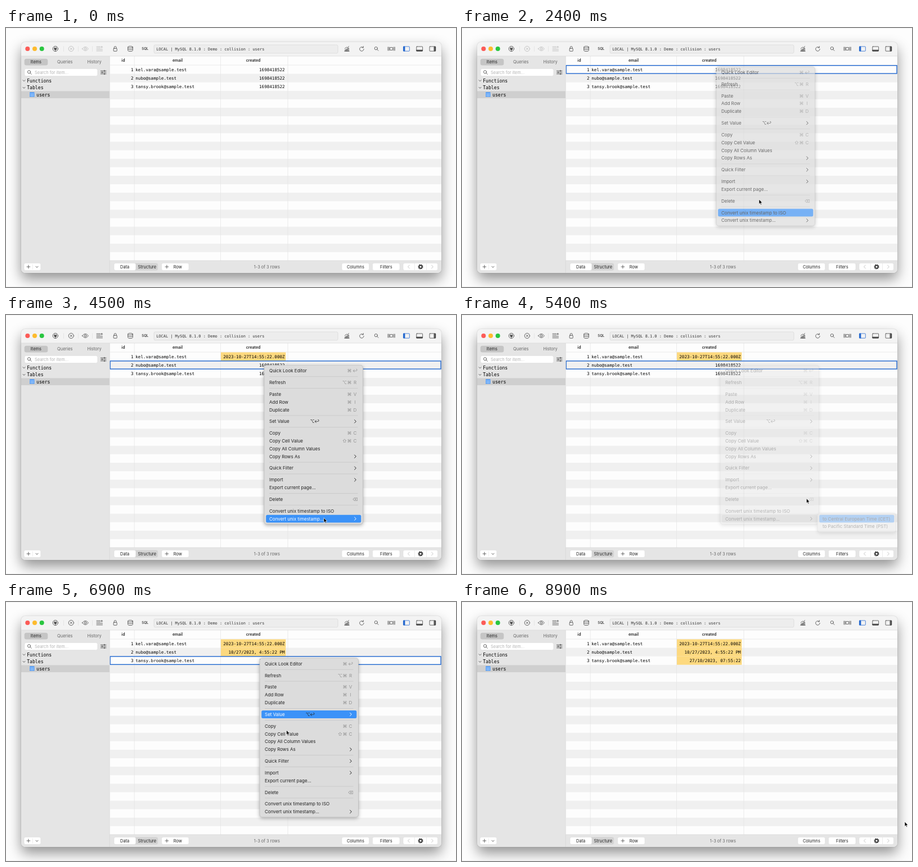
These frames come from a looping animation (800 px wide and 461 px high, 9000 ms). An HTML page:

```html
<!DOCTYPE html>
<html lang="en">
<head>
<meta charset="utf-8">
<title>Timestamp conversion</title>
<style>
html, body { margin: 0; width: 100%; height: 100%; overflow: hidden; background: #fdfdfd; }
svg { position: absolute; left: 0; top: 0; display: block; }
text { font: 7.45px Inter, "DejaVu Sans", sans-serif; fill: #222; white-space: pre; }
.window { position: absolute; left: 27px; top: 25px; width: 747px; height: 411px; border-radius: 7px;
  box-shadow: 0 0 1px rgba(0,0,0,.5), 0 11px 23px rgba(0,0,0,.42); }
.mono { font: 7.57px "DejaVu Sans Mono", monospace; fill: #000; }
.side { font-size: 8.13px; }
.title { font-size: 6.95px; fill: #333; }
.head { font-size: 6.95px; font-weight: 600; }
.sql { font-size: 6.1px; font-weight: 600; fill: #444; }
.dim { fill: #666; }
.hint { fill: #b4b4b4; }
.end { text-anchor: end; }
.mid { text-anchor: middle; }
.icon { fill: none; stroke: #454545; stroke-width: .8; stroke-linecap: round; stroke-linejoin: round; }
.off { stroke: #b9b9b9; }
.blue { stroke: #2468cf; }
.button { fill: #fff; stroke: #d9d9d9; stroke-width: .5; }
.menu text { font-size: 8.02px; }
.menu .key { text-anchor: middle; fill: #929292; }
.menu .dark { fill: #222; }
.panel { fill: #dcdcdc; stroke: #b5b5b5; stroke-width: .6; filter: drop-shadow(0 2px 3px rgba(0,0,0,.3)); }
.rule { stroke: #c3c3c3; stroke-width: .7; }
</style>
</head>
<body>
<div class="window"></div>
<svg id="stage" width="800" height="461" viewBox="0 0 800 461">
  <defs><clipPath id="frame"><rect x="27" y="25" width="747" height="411" rx="7"/></clipPath></defs>
  <path d="M0 .5H800M0 460.5H800" stroke="#f3f3f3"/>
  <g clip-path="url(#frame)">
    <rect x="27" y="25" width="747" height="411" fill="#e5e5e5"/>
    <rect x="27" y="25" width="747" height="25" fill="#f3f3f3"/>
    <rect x="184" y="50" width="590" height="364" fill="#fdfdfd"/>
    <g id="grid"></g>
    <path d="M27 50H774M184.3 50V436M184 414H774" stroke="#d6d6d6" stroke-width=".7"/>
  </g>

  <circle cx="38.3" cy="37" r="4" fill="#fc5b57"/>
  <circle cx="51" cy="37" r="4" fill="#fdbb2e"/>
  <circle cx="63.7" cy="37" r="4" fill="#29c640"/>
  <path d="M102.5 32.5V42M128.5 32.5V42M153.5 32.5V42" stroke="#dedede" stroke-width=".7"/>
  <g class="icon">
    <circle cx="87.8" cy="37" r="4.6"/>
    <path d="M86.3 34.2V36M89.3 34.2V36M87.8 39V41.4"/>
    <path d="M85.8 36H89.8V37.2Q89.8 39 87.8 39T85.8 37.2Z" fill="#454545"/>
  </g>
  <g class="icon edit">
    <circle cx="115.8" cy="37" r="4.6"/><path d="M114.1 35.3L117.5 38.7M117.5 35.3L114.1 38.7"/>
    <path d="M135.6 37Q141 29.8 146.4 37Q141 44.2 135.6 37Z"/><circle cx="141" cy="37" r="1.8"/>
    <path d="M161 33.3H168M161 35.8H168M161 38.3H171.5M161 40.8H171.5M170.3 36V32.7M169 34L170.3 32.7L171.6 34"/>
  </g>
  <g class="icon">
    <rect x="191.2" y="36.3" width="6" height="5" rx=".7"/><path d="M192.3 36.2V34.6Q192.3 32.7 194.2 32.7T196.1 34.6V36.2"/>
    <ellipse cx="221" cy="34" rx="4.3" ry="1.6"/>
    <path d="M216.7 34V40Q216.7 41.6 221 41.6T225.3 40V34M216.7 37Q216.7 38.6 221 38.6T225.3 37"/>
    <path d="M601.8 41.3H610.2M602.8 41V38.7H604.3V41M605.3 41V37.2H606.8V41M607.8 41V35.6H609.3V41M602.3 36.6L605.3 34.2L606.8 35L609.6 32.6"/>
    <path d="M634.9 34.7A3.7 3.7 0 1 0 636.1 37.4M633 34.9H635.3V32.6"/>
    <circle cx="657.8" cy="36.2" r="2.6"/><path d="M659.8 38.2L662 40.4"/>
    <rect x="682.8" y="34.7" width="4.6" height="4.6"/>
    <path d="M680.9 34V40M689.3 34V40M679 34V40M691.2 34V40"/>
    <rect x="729.8" y="33" width="10.8" height="8.2" rx=".8"/><path d="M730 39.2H740.4V41H730Z" fill="#454545"/>
    <rect x="753" y="33" width="10.8" height="8.2" rx=".8"/><path d="M761.3 33.2H763.5V41H761.3Z" fill="#454545"/>
    <g class="blue"><rect x="706.5" y="33" width="10.8" height="8.2" rx=".8"/><path d="M706.8 33.2H709V41H706.8Z" fill="#2468cf"/></g>
  </g>
  <text class="sql" x="241.2" y="39.3">SQL</text>
  <rect x="263" y="30" width="327" height="15" rx="2.5" fill="#ededed" stroke="#d4d4d4" stroke-width=".6"/>
  <text class="mono title" x="267.2" y="39.6">LOCAL | MySQL 8.1.0 : Demo : collision : users</text>

  <rect x="32.7" y="54.7" width="41.6" height="11.8" rx="3.5" fill="#c5c5c5"/>
  <text class="mid" x="53.3" y="63.2">Items</text>
  <text class="mid dim" x="104.8" y="63.2">Queries</text>
  <text class="mid dim" x="157" y="63.2">History</text>
  <rect class="button" x="33" y="72.4" width="129.8" height="13.2" rx="3"/>
  <g class="icon">
    <circle cx="41" cy="78.2" r="2.6"/><path d="M43 80.2L45.3 82.5"/>
    <path d="M168.3 76.3H178M168.3 79H178M168.3 81.7H178"/>
    <path d="M175 75.5V77.1M171 78.2V79.8M175 80.9V82.5" stroke-width="1.3"/>
    <path d="M30 92.7L32 94.8L34 92.7M30 105.3L32 107.4L34 105.3"/>
  </g>
  <text class="hint" x="51" y="81.7">Search for item...</text>
  <rect x="27" y="112.4" width="157" height="12.6" fill="#cfcfcf"/>
  <rect x="42" y="114.2" width="8.6" height="8.4" rx=".8" fill="#4c98f5"/>
  <path d="M42 116.8H50.6M42 119.6H50.6M44.9 116.8V122.6M47.8 116.8V122.6" stroke="#d6e7fb" stroke-width=".6"/>
  <text class="mono side" x="37.2" y="96.6">Functions</text>
  <text class="mono side" x="37.2" y="109.2">Tables</text>
  <text class="mono side" x="54" y="121.7">users</text>

  <g class="button">
    <rect x="32" y="418.5" width="29.8" height="13" rx="3"/>
    <rect x="192" y="418.5" width="78" height="13" rx="3" style="fill:#d3d3d3"/>
    <rect x="192" y="418.5" width="38.8" height="13" rx="3"/>
    <rect x="276.6" y="418.5" width="48.4" height="13" rx="3"/>
    <rect x="597" y="418.5" width="48.6" height="13" rx="3"/>
    <rect x="651.5" y="418.5" width="48.5" height="13" rx="3"/>
    <rect x="706" y="418.5" width="61.5" height="13" rx="3"/>
    <path d="M47.3 420.5V429.5M726.5 419V431M747.5 419V431"/>
  </g>
  <g class="icon">
    <path d="M37 425H42.8M39.9 422.1V427.9M52.9 424.2L55 426.4L57.1 424.2M283 425H288.8M285.9 422.1V427.9"/>
    <path class="off" d="M717.3 422L714.5 425L717.3 428M756.5 422L759.3 425L756.5 428"/>
    <circle cx="737" cy="425" r="2.6" style="stroke:#222;stroke-width:1.5"/>
    <circle cx="737" cy="425" r="3.9" style="stroke:#222;stroke-width:1.3;stroke-linecap:butt" stroke-dasharray="1.53 1.53"/>
  </g>
  <text class="mid" x="211.2" y="427.7">Data</text>
  <text class="mid" x="250.8" y="427.7">Structure</text>
  <text x="297.8" y="427.7">Row</text>
  <text class="mid dim" x="463.8" y="428.2">1-3 of 3 rows</text>
  <text class="mid" x="621.4" y="427.7">Columns</text>
  <text class="mid" x="675.8" y="427.7">Filters</text>

  <g id="menu" class="menu"></g>
  <path id="cursor" d="M0 0V8.4L1.9 6.7L3.2 9.7L4.6 9.1L3.3 6.2H5.9Z" stroke="#fff" stroke-width=".7"/>
</svg>
<script>
const LOOP = 9000, STEP = 100, LAG = 50, FADE = 300;
const ROW = 15.12, TOP = 66.4, PITCH = 13.85;
const $ = id => document.getElementById(id);
const text = (x, y, s, cls = "") => `<text x="${x}" y="${y}" class="${cls}">${s}</text>`;
const rect = (x, y, w, h, extra) => `<rect x="${x}" y="${y}" width="${w}" height="${h}" ${extra}/>`;

const rows = [
  { mail: "kel.vara@sample.test", date: "2023-10-27T14:55:22.000Z", done: 2600 },
  { mail: "nubo@sample.test", date: "10/27/2023, 4:55:22 PM", done: 5500 },
  { mail: "tansy.brook@sample.test", date: "27/10/2023, 07:55:22", done: 8500 },
];

const menus = [
  { x: 452, y: 69.1, open: 1100, pick: 2300, sub: Infinity },
  { x: 459, y: 89.3, open: 3600, pick: 5200, sub: 4700 },
  { x: 451, y: 99.9, open: 6500, pick: 8200, sub: 7300 },
];

// label, shortcut keys aligned right; "-" is a separator
const entries = [
  ["Quick Look Editor", "⌘↩"], "-", ["Refresh", "⌥⌘R"], "-",
  ["Paste", "⌘V"], ["Add Row", "⌘I"], ["Duplicate", "⌘D"], "-",
  ["Set Value", ">"], "-",
  ["Copy", "⌘C"], ["Copy Cell Value", "⇧⌘C"], ["Copy All Column Values", ""], ["Copy Rows As", ">"], "-",
  ["Quick Filter", ">"], "-", ["Import", ">"], ["Export current page...", ""], "-",
  ["Delete", "⌫"], "-", ["Convert unix timestamp to ISO", ""], ["Convert unix timestamp...", ">"],
];
const zones = ["to Central European Time (CET)", "to Pacific Standard Time (PST)"];

// time, x, y of the pointer tip
const path = [
  [200, 472, 266], [500, 462, 170], [900, 452, 72], [1300, 453, 74], [1600, 497, 208],
  [1900, 525, 300], [2100, 528, 328], [2300, 528, 328], [2400, 528, 305], [2800, 468, 122],
  [3200, 459, 91], [3800, 460, 94], [4150, 520, 270], [4400, 562, 360], [4500, 565, 361],
  [4700, 570, 362], [5000, 645, 362], [5300, 645, 362], [5900, 449, 149], [6300, 451, 102],
  [6700, 452, 106], [7100, 545, 350], [7250, 558, 373], [7400, 565, 373], [7800, 645, 374],
  [8000, 651, 385], [8100, 652.5, 385], [8300, 652.5, 385], [8900, 787, 391],
];

function pointer(t) {
  const i = path.findIndex(p => p[0] >= t);
  if (i <= 0) return (i ? path[path.length - 1] : path[0]).slice(1);
  const [a, b] = [path[i - 1], path[i]], k = (t - a[0]) / (b[0] - a[0]);
  return [a[1] + (b[1] - a[1]) * k, a[2] + (b[2] - a[2]) * k];
}

function drawGrid(t) {
  let s = "";
  for (let i = 1; i < 23; i += 2) s += rect(185, TOP + i * ROW, 589, ROW, 'fill="#f0f0f0"');
  s += '<path d="M185 66H774M228.2 50V414M381.5 50V414M501 50V414" stroke="#e2e2e2" stroke-width=".7"/>';
  s += text(208.4, 60, "id", "head mid") + text(305, 60, "email", "head mid") + text(439.6, 60, "created", "head mid");
  rows.forEach((r, i) => {
    const y = TOP + i * ROW, base = y + 10.3, done = t >= r.done;
    if (done) s += rect(382, y, 115.4, ROW, 'fill="#fdd97f"');
    s += text(226.6, base, i + 1, "mono end") + text(230.3, base, r.mail, "mono");
    s += text(495.6, base, done ? r.date : "1698418522", "mono end");
    if (t >= menus[i].open && !done) s += rect(185.2, y + .3, 587.8, ROW - .8, 'fill="none" stroke="#1f66cf" stroke-width="1.4"');
  });
  return s;
}

function menuRow(x, y, w, label, keys, fill, ink) {
  const color = ink ? ` style="fill:${ink}"` : "";
  let s = fill ? rect(x + 3.2, y - PITCH / 2, w - 6.4, PITCH, `rx="2.5" fill="${fill}"`) : "";
  s += `<g${color}>` + `<text x="${x + 9}" y="${y + 2.9}"${color}>${label}</text>`;
  if (keys === ">") {
    s += `<path d="M${x + 160.6} ${y - 2.7}l2.7 2.7l-2.7 2.7" class="icon" style="stroke:${ink || "#222"};stroke-width:1"/>`;
    if (label === "Set Value") s += text(x + 85.5, y + 2.9, "⌥", "key dark") + text(x + 93.5, y + 2.9, "↩", "key dark");
  } else {
    [...keys].reverse().forEach((k, i) => {
      s += `<text class="key" x="${x + 161.5 - [0, 10, 18.7][i]}" y="${y + 2.9}"${color}>${k}</text>`;
    });
  }
  return s + "</g>";
}

function drawMenu(m, t) {
  const [px, py] = pointer(Math.min(t, m.pick) - LAG);
  const nested = t >= m.sub, inSub = nested && px > m.x + 173;
  const ink = t > m.pick ? "" : "#fff";
  const over = y => Math.abs(py - y) < PITCH / 2;
  let s = rect(m.x, m.y, 175.5, 283, 'rx="4.5" class="panel"'), y = m.y + 10, last = y;
  for (const e of entries) {
    if (e === "-") {
      s += `<path class="rule" d="M${m.x + 9} ${y - 3.5}h157.5"/>`;
      y += 6.95;
      continue;
    }
    const hot = !inSub && over(y) && t - LAG > m.open;
    const parent = nested && e === entries[entries.length - 1];
    s += menuRow(m.x, y, 175.5, ...e, hot ? "#3b92f8" : parent ? "#c6c6c6" : "", hot ? ink : "");
    last = y;
    y += PITCH;
  }
  if (nested) {
    const x = m.x + 173;
    s += rect(x, last - 10, 139.5, 34, 'rx="4.5" class="panel"');
    zones.forEach((z, i) => {
      const zy = last + i * PITCH, hot = inSub && over(zy);
      s += menuRow(x, zy, 139.5, z, "", hot ? "#3b92f8" : "", hot ? ink : "");
    });
  }
  return s;
}

function render(t) {
  $("grid").innerHTML = drawGrid(t);
  document.querySelector(".edit").classList.toggle("off", t < rows[0].done);
  const m = menus.find(m => t >= m.open && t < m.pick + FADE);
  $("menu").innerHTML = m ? drawMenu(m, t) : "";
  $("menu").setAttribute("opacity", m ? Math.min(1, 1 - (t - m.pick) / FADE) : 1);
  $("cursor").setAttribute("transform", `translate(${pointer(t)})`);
  $("cursor").setAttribute("visibility", t < path[0][0] ? "hidden" : "visible");
}

const start = performance.now();
let shown = -1;
function tick() {
  const t = Math.floor(((performance.now() - start) % LOOP) / STEP) * STEP;
  if (t !== shown) render(shown = t);
  requestAnimationFrame(tick);
}
tick();
</script>
</body>
</html>
```
